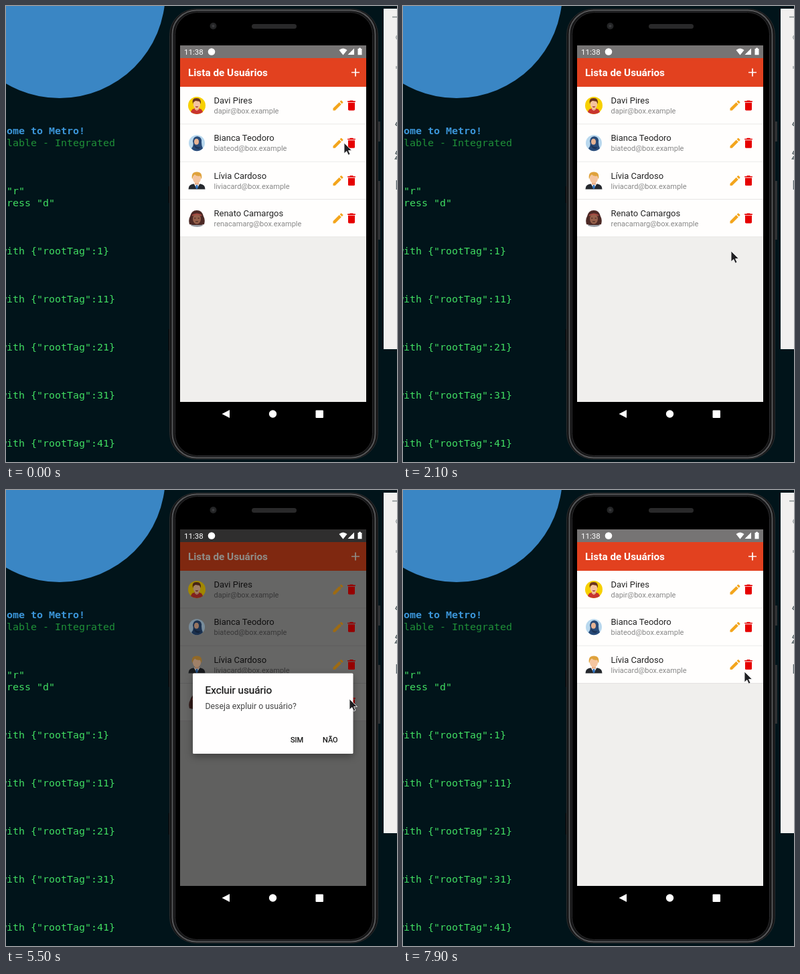
An HTML page for the animation above (8 s loop, 584x683 px).

```html
<!DOCTYPE html>
<html lang="pt">
<head>
<meta charset="utf-8">
<title>Lista de Usuários</title>
<style>
@property --d { syntax: "<number>"; inherits: true; initial-value: 0; }
html, body { margin: 0; width: 100%; height: 100%; overflow: hidden; background: #01141a; }
svg { display: block; width: 584px; height: 683px; font-family: Roboto, sans-serif; animation: dialog 8s step-end infinite; }
.term { font: 14.95px "DejaVu Sans Mono", "Liberation Mono", monospace; fill: #40dc62; white-space: pre; }
.name { font-size: 13px; fill: #242424; }
.mail { font-size: 11px; fill: #888; }
.btn { font-size: 11px; }
.medium { fill: #111; stroke: #111; stroke-width: .25; }
.dim { opacity: calc(var(--d) * .6); }
.tint { opacity: calc(var(--d) * .47); }
.art { filter: brightness(calc(1 - var(--d) * .35)); }
.box { opacity: min(1, var(--d) * 1.45); }
.panel { filter: drop-shadow(0 4px 6px rgba(0, 0, 0, .35)); }
.last { animation: last 8s step-end infinite; }
.tap { opacity: 0; animation: 8s step-end infinite; }
.tap1 { animation-name: tap1; }
.tap2 { animation-name: tap2; }
.tap3 { animation-name: tap3; transform-origin: 428px 381px; }
.cursor { animation: cursor 8s linear infinite; }

@keyframes dialog {
  0% { --d: 0; }
  12.5% { --d: .67; }
  13.75% { --d: 1; }
  25% { --d: .5; }
  26.25% { --d: 0; }
  67.5% { --d: .67; }
  68.75% { --d: 1; }
  81.25% { --d: .6; }
  82.5% { --d: .2; }
  83.75%, 100% { --d: 0; }
}
@keyframes last { 0% { opacity: 1; } 81.25%, 100% { opacity: 0; } }
@keyframes tap1 { 0% { opacity: 0; } 10% { opacity: .09; } 12.5%, 100% { opacity: 0; } }
@keyframes tap2 { 0% { opacity: 0; } 65% { opacity: .06; } 66.25% { opacity: .09; } 67.5%, 100% { opacity: 0; } }
@keyframes tap3 {
  0% { opacity: 0; transform: scale(1); }
  80% { opacity: .15; transform: scale(1); }
  81.25% { opacity: .15; transform: scale(1.9); }
  83.75%, 100% { opacity: 0; transform: scale(1); }
}
@keyframes cursor {
  0% { transform: translate(505px, 205px); animation-timing-function: steps(2); }
  2.5% { transform: translate(519px, 178px); animation-timing-function: steps(2); }
  5%, 6.25% { transform: translate(508px, 146px); animation-timing-function: steps(2); }
  8.75%, 12.5% { transform: translate(506px, 142px); animation-timing-function: steps(4); }
  17.5% { transform: translate(484px, 369px); animation-timing-function: steps(2); }
  20%, 27.5% { transform: translate(490px, 367px); animation-timing-function: steps(3); }
  31.25%, 38.75% { transform: translate(514px, 311px); animation-timing-function: steps(1); }
  40% { transform: translate(517px, 311px); animation-timing-function: steps(2); }
  42.5% { transform: translate(522px, 317px); animation-timing-function: steps(1); }
  43.75%, 46.25% { transform: translate(520px, 315px); animation-timing-function: steps(5); }
  52.5%, 53.75% { transform: translate(508px, 268px); animation-timing-function: steps(6); }
  61.25%, 71.25% { transform: translate(513px, 313px); animation-timing-function: steps(5); }
  77.5%, 85% { transform: translate(426px, 381px); animation-timing-function: steps(6); }
  92.5%, 93.75% { transform: translate(500px, 272px); animation-timing-function: steps(4); }
  98.75%, 100% { transform: translate(510px, 272px); }
}
</style>
</head>
<body>
<svg viewBox="0 0 584 683">
  <defs>
    <clipPath id="sim"><rect x="413" y="365" width="43" height="23" rx="2"/></clipPath>
    <g id="row">
      <rect x="260" y="121" width="278" height="56.4" fill="#fffefd"/>
      <path d="M260 177h278" stroke="#e2e1df"/>
    </g>
    <g id="tools">
      <path fill="#f3a51c" transform="translate(486 139) scale(.833)" d="M3 17.25V21h3.75L17.81 9.94l-3.75-3.75zM20.71 7.04a1 1 0 0 0 0-1.41l-2.34-2.34a1 1 0 0 0-1.41 0l-1.83 1.83 3.75 3.75z"/>
      <path fill="#e60000" transform="translate(506 139) scale(.833)" d="M6 19c0 1.1.9 2 2 2h8c1.1 0 2-.9 2-2V7H6zM19 4h-3.5l-1-1h-5l-1 1H5v2h14z"/>
    </g>
  </defs>

  <!-- terminal -->
  <rect width="584" height="683" fill="#01141a"/>
  <circle cx="80" cy="-20" r="158" fill="#3a86c4"/>
  <g class="term">
    <text x="-8" y="192" font-weight="700" style="fill:#3b95d8">come to Metro!</text>
    <text x="-8" y="210" style="fill:#1f9038">alable - Integrated</text>
    <text x="1" y="282">"r"</text>
    <text x="-8" y="300">press "d"</text>
    <text x="-8" y="372">with {"rootTag":1}</text>
    <text x="-8" y="444">with {"rootTag":11}</text>
    <text x="-8" y="516">with {"rootTag":21}</text>
    <text x="-8" y="588">with {"rootTag":31}</text>
    <text x="-8" y="660">with {"rootTag":41}</text>
  </g>

  <!-- side panel -->
  <rect x="564" y="4" width="20" height="510" fill="#f1f0ef"/>
  <g fill="none" stroke="#59666a" stroke-width="1.6">
    <path d="M577 16.5h7" stroke="#8a9294"/>
    <path d="M584 44l-1.5 3 1.5 3M583 90v4" stroke="#a4abad"/>
    <path d="M584 174l-2 3.5 2 2M584 217l-2 4 2 1m0 3l-2.5 4h3"/>
    <path d="M583.5 261v14"/>
  </g>

  <!-- phone -->
  <path d="M557 173v30M557 262v88" stroke="#303133" stroke-width="4"/>
  <path d="M243.5 270v25M243.5 484v32" stroke="#0a0b0c" stroke-width="2"/>
  <rect x="244.5" y="4.5" width="311" height="674" rx="39" fill="#141415" stroke="#2b2c2e"/>
  <rect x="248.5" y="6.5" width="303" height="670" rx="36" fill="none" stroke="#555658" stroke-width="2"/>
  <rect x="252.5" y="9.5" width="295" height="664" rx="33" fill="#000" stroke="#2c2c2e"/>
  <circle cx="309.5" cy="30" r="5" fill="#242526"/>
  <circle cx="309.5" cy="30" r="2" fill="#3a3b3d"/>
  <rect x="367" y="27" width="67" height="7" rx="3.5" fill="#29292a"/>
  <g fill="#fff">
    <path d="M334 605v12l-11.5-6z"/>
    <circle cx="398.5" cy="611" r="5.7"/>
    <rect x="462.5" y="605.5" width="11.5" height="11.5" rx="1"/>
  </g>

  <!-- app -->
  <rect x="260" y="59" width="278" height="534" fill="#f0efed"/>
  <rect x="260" y="59" width="278" height="19" fill="#767474"/>
  <rect x="260" y="78" width="278" height="43" fill="#e2411f"/>
  <text x="272" y="105" font-size="15.3" font-weight="700" fill="#fff">Lista de Usuários</text>
  <path d="M516 99.5h12M522 93.5v12" stroke="#fff" stroke-width="1.7"/>
  <g>
    <use href="#row"/>
    <text class="name" x="310.5" y="146">Davi Pires</text>
    <text class="mail" x="310.5" y="161">dapir@box.example</text>
  </g>
  <g transform="translate(0 56.3)">
    <use href="#row"/>
    <text class="name" x="310.5" y="146">Bianca Teodoro</text>
    <text class="mail" x="310.5" y="161">biateod@box.example</text>
  </g>
  <g transform="translate(0 112.6)">
    <use href="#row"/>
    <text class="name" x="310.5" y="146">Lívia Cardoso</text>
    <text class="mail" x="310.5" y="161">liviacard@box.example</text>
  </g>
  <g class="last"><g transform="translate(0 168.9)">
    <use href="#row"/>
    <text class="name" x="310.5" y="146">Renato Camargos</text>
    <text class="mail" x="310.5" y="161">renacamarg@box.example</text>
  </g></g>

  <rect class="dim" x="260" y="59" width="278" height="19"/>
  <rect class="tint" x="260" y="78" width="278" height="43" fill="#100c00"/>
  <rect class="dim" x="260" y="121" width="278" height="472"/>

  <!-- status bar -->
  <g fill="#fff">
    <text x="266" y="72.5" font-size="11.5">11:38</text>
    <circle cx="307" cy="68.5" r="5.3"/>
    <path d="M497.5 66q6-5 12 0l-6 7.5zM520 63.5v9.5h-9.5zM525.5 64h1.5v-1.3h3v1.3h1.5v9.3h-6z"/>
  </g>

  <!-- avatars and row icons -->
  <g class="art">
    <use href="#tools"/>
    <circle cx="285" cy="149" r="13" fill="#f7d000"/>
    <path d="M276 159q1-6 9-6t9 6q-4 3-9 3t-9-3z" fill="#c8342f"/>
    <path d="M282 151h6v4l-3 2-3-2z" fill="#eab08b"/>
    <ellipse cx="285" cy="147.5" rx="5.2" ry="6.5" fill="#f5c3a0"/>
    <path d="M279 147q-2-9 5-9 8-1 7 9l-2-4-6-1-3 2z" fill="#6b3420"/>
    <path d="M282.5 150.5h5q-2.5 3-5 0z" fill="#8e2420"/>
  </g>
  <g class="art" transform="translate(0 56.3)">
    <use href="#tools"/>
    <circle cx="285" cy="149" r="12" fill="#b9d8ee"/>
    <path d="M277 157q4-4 2-11 1-7 7-7 7 1 6 9 0 5 2 9-4 4-9 4-5 0-8-4z" fill="#284a78"/>
    <ellipse cx="284.5" cy="147" rx="3.5" ry="4.5" fill="#e7b393"/>
    <path d="M280 151q5 5 11 4l-3 3q-6 0-8-7z" fill="#1c3459"/>
  </g>
  <g class="art" transform="translate(0 112.6)">
    <use href="#tools"/>
    <path d="M272.5 162q0-7 7-8h11q7 1 7 8z" fill="#25282d"/>
    <path d="M280.5 153.5h9l-4.5 8z" fill="#f4f4f4"/>
    <path d="M284 155.5h2l1 4-2 2.5-2-2.5z" fill="#2d70bd"/>
    <rect x="282" y="149" width="6" height="6" fill="#e9ad87"/>
    <ellipse cx="285" cy="146" rx="6" ry="7" fill="#f5c5a0"/>
    <path d="M278 147q-2-11 7-11t7 11l-2-5q-5 1-8-2l-2 2z" fill="#dfa23c"/>
  </g>
  <g class="last"><g class="art" transform="translate(0 168.9)">
    <use href="#tools"/>
    <path d="M276 160q2-5 9-5t9 5q-8 4-18 0z" fill="#9aa0a8"/>
    <path d="M274 158q-2-7 1-12 2-9 10-9t10 9q3 5 1 12l-5 1h-12z" fill="#4c2925"/>
    <ellipse cx="285" cy="150" rx="6" ry="7.5" fill="#96604b"/>
    <path d="M278 145q7-5 14 0" fill="none" stroke="#a64a42" stroke-width="2"/>
    <path d="M281 149h2.5M286.5 149h2.5M283 154h4" stroke="#38201d"/>
  </g></g>
  <circle class="tap tap1" cx="516" cy="149" r="13"/>
  <circle class="tap tap2" cx="516" cy="318" r="13"/>

  <!-- dialog -->
  <g class="box">
    <rect class="panel" x="279" y="274.5" width="239.5" height="120.5" rx="1.5" fill="#fffefe"/>
    <g clip-path="url(#sim)"><circle class="tap tap3" cx="428" cy="381" r="15.5"/></g>
    <text class="medium" x="297.5" y="304.5" font-size="15.3">Excluir usuário</text>
    <text x="297.5" y="328" font-size="12.3" fill="#444">Deseja expluir o usuário?</text>
    <text class="btn medium" x="425" y="378">SIM</text>
    <text class="btn medium" x="473" y="378">NÃO</text>
  </g>

  <g class="cursor">
    <path d="M0 0V16l3.8-3.4 2.5 5.6 2.7-1.2-2.5-5.4H11.5z" fill="#1f1f22" stroke="#f4f4f4" stroke-width=".9"/>
  </g>
</svg>
</body>
</html>
```
